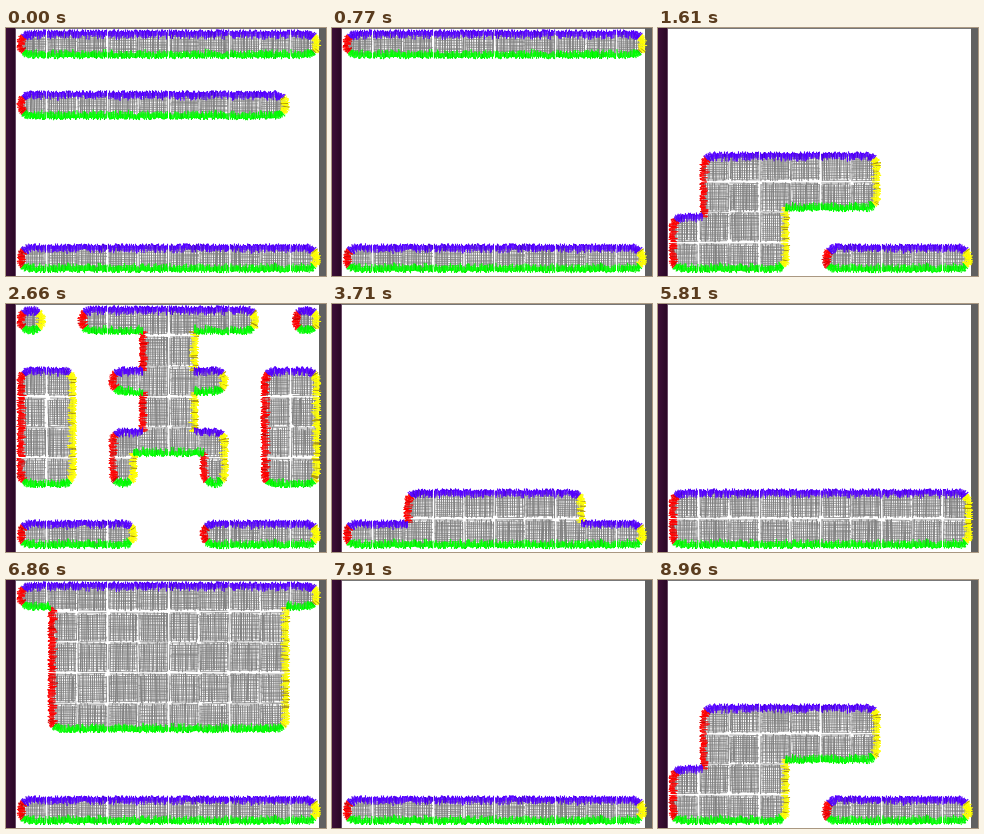
An HTML page with a canvas that plays this animation: 320 by 248 pixels, repeating every 9870 ms.

```html
<!DOCTYPE html>
<html>
<head>
<meta charset="utf-8">
<style>
html, body { margin: 0; width: 100%; height: 100%; overflow: hidden; background: #fff; }
canvas { display: block; width: 320px; height: 248px; }
</style>
</head>
<body>
<canvas id="stage" width="320" height="248"></canvas>
<script>
const ctx = document.getElementById('stage').getContext('2d');
const LOOP = 9870, COLS = 10, ROWS = 8, SIZE = 30.5, LEFT = 10, TOP = 1.2, RADIUS = 14.5;

// Blocks of tiles: first column, first row, columns, rows
const floor = [0, 7, 10, 1], roof = [0, 0, 10, 1];
const steps = [[1, 4, 6, 2], [0, 6, 4, 2], [5, 7, 5, 1]];
const tower = [
  [0, 0, 1, 1], [2, 0, 6, 1], [9, 0, 1, 1], [4, 1, 2, 4],
  [3, 2, 4, 1], [3, 4, 4, 1], [3, 5, 1, 1], [6, 5, 1, 1],
  [0, 2, 2, 4], [8, 2, 2, 4], [0, 7, 4, 1], [6, 7, 4, 1]
];
const scenes = [
  [0, [roof, [0, 2, 9, 1], floor]],
  [490, [roof, floor]],
  [1610, steps],
  [2660, tower],
  [3710, [[2, 6, 6, 1], floor]],
  [4760, [floor]],
  [5810, [[0, 6, 10, 2]]],
  [6860, [roof, [1, 1, 8, 4], floor]],
  [7910, [floor]],
  [8960, steps]
];

// Each side: colours, outward step, step along the edge
const sides = [
  { color: '#f00', dark: '#d00000', out: [-1, 0], along: [0, 1] },
  { color: '#ff0', dark: '#b09a00', out: [1, 0], along: [0, 1] },
  { color: '#5500ff', dark: '#4a00dc', out: [0, -1], along: [1, 0] },
  { color: '#0f0', dark: '#00e000', out: [0, 1], along: [1, 0] }
];

function seeded(n) {
  let s = (n * 2654435761) >>> 0;
  return () => {
    s = (s + 0x6D2B79F5) >>> 0;
    let t = Math.imul(s ^ (s >>> 15), 1 | s);
    t ^= t + Math.imul(t ^ (t >>> 7), 61 | t);
    return ((t ^ (t >>> 14)) >>> 0) / 4294967296;
  };
}

function rect(color, x, y, w, h) {
  ctx.fillStyle = color;
  ctx.fillRect(x, y, w, h);
}

function line(color, width, [x1, y1], [x2, y2]) {
  ctx.strokeStyle = color;
  ctx.lineWidth = width;
  ctx.beginPath();
  ctx.moveTo(x1, y1);
  ctx.lineTo(x2, y2);
  ctx.stroke();
}

function drawBackdrop() {
  rect('#fff', 0, 0, 320, 248);
  const shade = ctx.createLinearGradient(0, 0, 9, 0);
  shade.addColorStop(0, '#3d0f37');
  shade.addColorStop(1, '#2b0826');
  rect(shade, 0, 0, 9, 248);
  rect('#6a4a66', 9, 0, 1, 248);
  rect('#777', 10, 0, 303, 1);
  rect('#606060', 313, 0, 7, 248);
}

function drawHatch(c, r, has) {
  const x = Math.round(LEFT + c * SIZE), y = Math.round(TOP + r * SIZE);
  const rnd = seeded(c * 31 + r * 977 + 5);
  const open = (dx, dy) => !has(c + dx, r + dy);
  const corner = (dx, dy) => open(dx, 0) && open(0, dy) ? RADIUS - 3 : 0;
  const inset = (dx, dy) => open(dx, dy) ? 4 : 0;
  const l = inset(-1, 0), t = inset(0, -1);
  ctx.save();
  ctx.beginPath();
  ctx.roundRect(x + l, y + t, SIZE - l - inset(1, 0), SIZE - t - inset(0, 1),
    [corner(-1, -1), corner(1, -1), corner(1, 1), corner(-1, 1)]);
  ctx.clip();
  // Slightly crooked strokes, with ragged ends that leave pale seams
  const weave = (color, width, gap, place) => {
    for (let a = 1; a < SIZE - 0.5; a += gap * (0.6 + rnd() * 0.8)) {
      const lean = (rnd() - 0.5) * 1.4;
      line(color, width, place(a, rnd() * 3.2), place(a + lean, SIZE - rnd() * 3.2));
    }
  };
  weave('#989898', 0.9, 2.1, (a, d) => [x + d, y + a]);
  weave('#808080', 1, 1.75, (a, d) => [x + a, y + d]);
  ctx.restore();
}

function drawEdge(c, r, has, side, k) {
  const [ox, oy] = side.out, [ax, ay] = side.along;
  if (has(c + ox, r + oy)) return;
  const x = Math.round(LEFT + c * SIZE), y = Math.round(TOP + r * SIZE);
  const rnd = seeded(c * 131 + r * 1709 + k * 7919 + 11);
  const startOpen = !has(c - ax, r - ay), endOpen = !has(c + ax, r + ay);
  const eighth = RADIUS * Math.PI / 4;
  // Inner corners let the fringe run a little past the tile
  const from = startOpen ? RADIUS - eighth : has(c - ax + ox, r - ay + oy) ? -5 : 0;
  const to = endOpen ? SIZE - RADIUS + eighth : has(c + ax + ox, r + ay + oy) ? SIZE + 5 : SIZE;
  const place = (a, d) => ax
    ? [x + a, oy < 0 ? y + d : y + SIZE - d]
    : [ox < 0 ? x + d : x + SIZE - d, y + a];
  for (let a = -4.5; a < SIZE + 5; a++) {
    const jag = rnd(), reach = rnd(), tone = rnd(), lean = (rnd() - 0.5) * 1.4;
    if (a < from || a >= to) continue;
    // Strokes point at the centre of a rounded corner
    let base = a, angle = 0;
    if (startOpen && a < RADIUS) {
      base = RADIUS;
      angle = (a - RADIUS) / RADIUS;
    } else if (endOpen && a > SIZE - RADIUS) {
      base = SIZE - RADIUS;
      angle = (a - base) / RADIUS;
    }
    const at = (d, shift) => place(
      base + Math.sin(angle) * (RADIUS - d) + shift,
      RADIUS - Math.cos(angle) * (RADIUS - d));
    const d = 0.3 + jag * 2.6;
    line(tone < 0.14 ? side.dark : side.color, 1.1, at(d, 0), at(d + 4.6 + reach * 3.6, lean));
  }
}

function drawScene(blocks) {
  const has = (c, r) => blocks.some(([x, y, w, h]) => c >= x && c < x + w && r >= y && r < y + h);
  const tiles = [];
  for (let r = 0; r < ROWS; r++)
    for (let c = 0; c < COLS; c++)
      if (has(c, r)) tiles.push([c, r]);
  drawBackdrop();
  tiles.forEach(([c, r]) => drawHatch(c, r, has));
  sides.forEach((side, k) => tiles.forEach(([c, r]) => drawEdge(c, r, has, side, k)));
}

let shown = -1;
const start = performance.now();
function tick() {
  const t = (performance.now() - start) % LOOP;
  const i = scenes.filter(s => s[0] <= t).length - 1;
  if (i !== shown) drawScene(scenes[shown = i][1]);
  requestAnimationFrame(tick);
}
tick();
</script>
</body>
</html>
```
